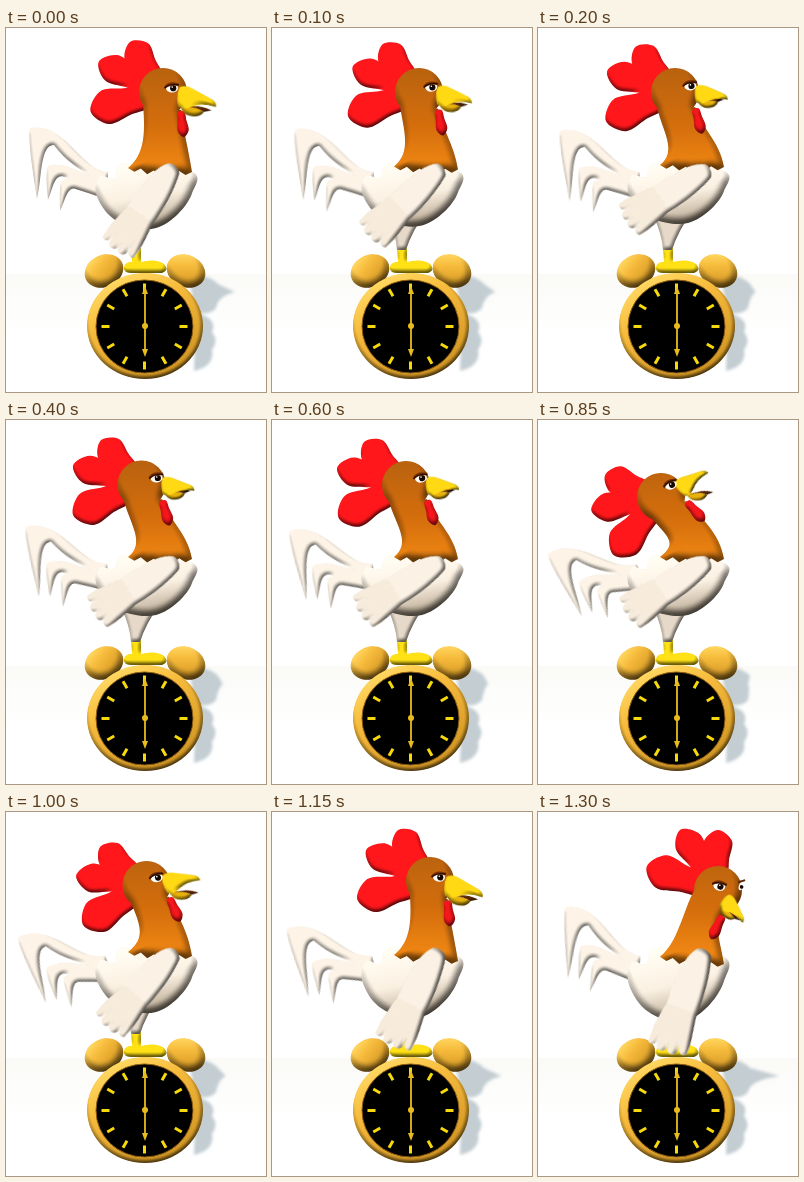
These frames come from a looping animation (260 px wide and 364 px high, 3.3 s). An HTML page:

```html
<!DOCTYPE html>
<html lang="en">
<head>
<meta charset="utf-8">
<title>Rooster on an alarm clock</title>
<style>
html, body { margin: 0; width: 100%; height: 100%; overflow: hidden; background: #fff; }
svg { display: block; width: 100%; height: 100%; }
</style>
</head>
<body>
<svg viewBox="0 0 260 364">
  <defs>
    <filter id="round" x="-10%" y="-10%" width="120%" height="120%" color-interpolation-filters="sRGB">
      <feGaussianBlur in="SourceAlpha" stdDeviation="4"/>
      <feDiffuseLighting surfaceScale="6" diffuseConstant="1.2" lighting-color="#fff" result="lit">
        <feDistantLight azimuth="250" elevation="58"/>
      </feDiffuseLighting>
      <feComposite in="SourceGraphic" in2="lit" operator="arithmetic" k1=".85" k2=".18"/>
    </filter>
    <filter id="thin" x="-10%" y="-10%" width="120%" height="120%" color-interpolation-filters="sRGB">
      <feGaussianBlur in="SourceAlpha" stdDeviation="2"/>
      <feDiffuseLighting surfaceScale="3" diffuseConstant="1.2" lighting-color="#fff" result="lit">
        <feDistantLight azimuth="250" elevation="58"/>
      </feDiffuseLighting>
      <feComposite in="SourceGraphic" in2="lit" operator="arithmetic" k1=".85" k2=".18"/>
    </filter>
    <filter id="soft" x="-20%" y="-20%" width="140%" height="140%"><feGaussianBlur stdDeviation="1.5"/></filter>
    <linearGradient id="floor" x2="0" y2="1">
      <stop stop-color="#fafaf7"/><stop offset="1" stop-color="#fff"/>
    </linearGradient>
    <linearGradient id="gold" x2=".6" y2="1">
      <stop stop-color="#ffe070"/><stop offset=".45" stop-color="#efb53a"/><stop offset="1" stop-color="#cc9222"/>
    </linearGradient>
    <linearGradient id="cream" x2=".3" y2="1">
      <stop stop-color="#fffaf1"/><stop offset=".6" stop-color="#f3e9db"/><stop offset="1" stop-color="#b9aa95"/>
    </linearGradient>
    <linearGradient id="rust" gradientUnits="userSpaceOnUse" x1="0" y1="45" x2="0" y2="145">
      <stop stop-color="#b5600f"/><stop offset=".5" stop-color="#cd6a0c"/><stop offset="1" stop-color="#ea8413"/>
    </linearGradient>
  </defs>
  <rect y="246" width="260" height="60" fill="url(#floor)"/>
  <g fill="#c3cdd2" filter="url(#soft)">
    <path id="shade"/>
    <path d="M190 285Q212 290 206 304Q213 312 206 322Q209 338 188 343Z"/>
  </g>
  <g id="tail" fill="#f6ede0" filter="url(#thin)"></g>
  <g filter="url(#round)" fill="url(#gold)">
    <ellipse cx="98" cy="243" rx="20" ry="16" transform="rotate(-25 98 243)"/>
    <ellipse cx="180" cy="243" rx="20" ry="16" transform="rotate(25 180 243)"/>
  </g>
  <ellipse cx="139" cy="298" rx="58" ry="53" fill="url(#gold)" filter="url(#thin)"/>
  <ellipse cx="138.5" cy="298.5" rx="48.5" ry="46.5" stroke="#8a5c14"/>
  <g id="ticks" stroke="#f6da0c" stroke-width="3"></g>
  <g stroke="#e8bc1c" fill="#e8bc1c">
    <path d="M139 262V326" stroke-width="1.8"/>
    <path d="M139 258L142 266H136ZM139 329L136 321H142Z" stroke="none"/>
    <circle cx="139" cy="298" r="3" stroke="none"/>
  </g>
  <path d="M125 219H135L135 234Q150 230 158 236Q164 242 156 245H126Q117 245 118 239Q119 234 126 234Z" fill="#f8da14" filter="url(#thin)"/>
  <path d="M114 184L154 184Q140 203 134 222L125 222Q124 206 114 184Z" fill="#dfd3c3" filter="url(#thin)"/>
  <path id="body" fill="url(#cream)" filter="url(#round)"/>
  <g id="comb" fill="#f8161a" filter="url(#thin)"></g>
  <g fill="url(#rust)" filter="url(#round)">
    <path id="neck"/>
    <circle id="skull" r="24"/>
  </g>
  <path id="wattle" fill="#ee161a" filter="url(#thin)"/>
  <g id="beak" filter="url(#thin)">
    <g id="jaw">
      <path d="M-1 7Q12 5 22 10Q18 17 8 15Q2 14-1 7Z" fill="#e2ae0c"/>
      <path d="M3 8Q12 5 22 10L29 8Q16 3 3 8Z" fill="#5a2503"/>
    </g>
    <path d="M-1-11Q5-14 12-9Q22-3 30 2Q34 5 33 9Q20 4 9 8Q2 11-3 7Q-5-3-1-11Z" fill="#fbd312"/>
  </g>
  <g id="eye">
    <ellipse rx="6" ry="4.6" fill="#fff"/>
    <circle cx="1.2" cy=".2" r="3.1" fill="#160800"/>
    <circle cx=".2" cy="-.9" r=".8" fill="#fff"/>
    <path d="M-8-1Q-4-8 7-4.5L6-2Q-2-4-7 1Z" fill="#7d3204"/>
    <path d="M-7.5 0Q-2-5 7-3" fill="none" stroke="#2a1002" stroke-width="1.3"/>
    <g id="farEye">
      <ellipse cx="21" cy="-6" rx="2.4" ry="4" fill="#fff"/>
      <circle cx="21.6" cy="-5.5" r="1.8" fill="#160800"/>
      <path d="M17-9L23-13" stroke="#5d2603" stroke-width="2"/>
    </g>
  </g>
  <g id="wing" filter="url(#thin)">
    <path d="M12-5C0-16-30-15-56-14Q-62 0-54 14C-35 17-5 14 10 9Q16 2 12-5Z" fill="#f4eadd"/>
    <g id="fingers" stroke="#f0e5d6" stroke-width="9.5" stroke-linecap="round"></g>
  </g>
</svg>
<script>
const $ = id => document.getElementById(id);
const lerp = (a, b, k) => a + (b - a) * k;
const set = (id, name, v) => $(id).setAttribute(name, v);
const rad = Math.PI / 180;

function add(id, d) {
  const el = document.createElementNS('http://www.w3.org/2000/svg', 'path');
  if (d) el.setAttribute('d', d);
  return $(id).appendChild(el);
}

// Head place, tilt and yaw; beak gape; wing and tail angles; body sink
const keys = [
  { t: 0, x: 157, y: 64, tilt: 0, yaw: 0, gape: 8, wing: 56, tail: 0, sink: 5 },
  { t: 200, x: 137, y: 64, tilt: 8, yaw: 7, gape: 0, wing: 33, tail: 2, sink: 0 },
  { t: 600, x: 134, y: 65, tilt: 11, yaw: 7, gape: 0, wing: 33, tail: 8, sink: 0 },
  { t: 850, x: 123, y: 77, tilt: 36, yaw: 6, gape: 42, wing: 34, tail: 23, sink: 0 },
  { t: 1150, x: 158, y: 69, tilt: -1, yaw: 0, gape: 6, wing: 64, tail: 12, sink: 10 },
  { t: 1300, x: 180, y: 78, tilt: -33, yaw: -10, gape: 0, wing: 70, tail: -4, sink: 13 }
];
const LOOP = 3300;

// The motion advances in held steps: 100 ms, then 150 ms, then a long rest
const hold = t => t < 700 ? t - t % 100 : Math.min(1300, 700 + Math.floor((t - 700) / 150) * 150);

function poseAt(t) {
  const i = Math.max(1, keys.findIndex(k => k.t >= t));
  const [a, b] = [keys[i - 1], keys[i]], pose = {};
  for (const k in a) pose[k] = lerp(a[k], b[k], (t - a.t) / (b.t - a.t));
  return pose;
}

// Closed Catmull-Rom curve
function loop(pts) {
  const at = i => pts[(i + pts.length) % pts.length];
  const ctrl = (p, a, b) => p.map((v, j) => v + (b[j] - a[j]) / 6);
  return `M${pts[0]}` + pts.map((p, i) =>
    `C${ctrl(p, at(i - 1), at(i + 1))} ${ctrl(at(i + 1), at(i + 2), p)} ${at(i + 1)}`).join('') + 'Z';
}

// Drop shape that swells towards its tip
function lobe([rx, ry], [tx, ty], w) {
  const len = Math.hypot(tx - rx, ty - ry);
  const at = (k, s) => [lerp(rx, tx, k) - (ty - ry) / len * w * s, lerp(ry, ty, k) + (tx - rx) / len * w * s];
  return loop([at(0, .6), at(.35, .8), at(.75, 1), at(1, 0), at(.75, -1), at(.35, -.8), at(0, -.6)]);
}

function plume([cx, cy], [tx, ty], i) {
  const s = [1, .6, .5][i], by = 149 + i * 7;
  return `M102 ${by - 5}C75 ${by - 6} ${cx + 36 * s} ${cy - 6} ${cx} ${cy}` +
    `Q${cx - 3} ${cy + 10 * s} ${tx} ${ty}` +
    `C${tx + 5} ${ty - 20 * s} ${cx + 10 * s} ${cy + 16 * s} ${cx + 24 * s} ${cy + 17 * s}` +
    `Q${lerp(cx, 102, .5)} ${lerp(cy, by, .7) + 4} 102 ${by + 9}Z`;
}

// Ragged lower edge of the neck
function ragged([x0, y0], [x1, y1]) {
  let d = '';
  for (let i = 1; i < 10; i++) {
    const k = i / 10;
    d += `L${lerp(x0, x1, k)} ${lerp(y0, y1, k) + Math.sin(k * Math.PI) * 3 + (i % 2 ? 2.5 : -2)}`;
  }
  return d;
}

for (let i = 0; i < 12; i++) {
  const at = r => `${138.5 + Math.sin(i * 30 * rad) * r} ${298.5 - Math.cos(i * 30 * rad) * r}`;
  add('ticks', `M${at(35)}L${at(43)}`);
}
for (let i = -1.5; i < 2; i++) add('fingers', `M-48 ${i * 7}L${-83 + Math.abs(i) * 3} ${i * 10}`);
[[[24, 100], [31, 171]], [[42, 138], [42, 172]], [[56, 152], [54, 183]]]
  .forEach(([crest, tip], i) => add('tail', plume(crest, tip, i)));
const lobes = [0, 1, 2].map(() => add('comb'));
const torso = [[120, 135], [108, 149], [94, 147], [90, 163], [103, 183],
  [125, 194], [150, 195], [172, 182], [186, 163], [186, 143]];

function draw(p) {
  const c = Math.cos(p.tilt * rad), s = Math.sin(p.tilt * rad);
  const head = (x, y) => [p.x + x * c + y * s, p.y - x * s + y * c];

  lobes.forEach((el, i) => {
    const a = ([33, 65, 105][i] + p.tilt) * rad;
    const out = r => [p.x - Math.sin(a) * r, p.y - Math.cos(a) * r];
    el.setAttribute('d', lobe(out(16), out([60, 71, 75][i]), [14, 14, 17][i]));
  });

  const left = [122, 137 + p.sink * .6], right = [186, 139 + p.sink];
  set('neck', 'd', `M${left}C${left[0] + 18} ${left[1] - 14} ${head(-18, 37)} ${head(-20, 12)}` +
    `L${head(18, 18)}C${head(20, 38)} ${right[0] - 4} ${right[1] - 26} ${right}${ragged(right, left)}Z`);
  set('skull', 'cx', p.x);
  set('skull', 'cy', p.y);
  set('wattle', 'd', lobe(head(18, 20), head(21, 45), 5.5));
  set('body', 'd', loop(torso.map(([x, y]) => [x, 135 + (y - 135) * (1 + p.sink / 60)])));

  const size = 1.05 - .025 * Math.abs(p.yaw);
  set('beak', 'transform', `translate(${head(18 + p.yaw * .6, 7)}) rotate(${-p.tilt - p.gape * .3}) scale(${size})`);
  set('jaw', 'transform', `rotate(${p.gape} 0 7)`);
  set('eye', 'transform', `translate(${head(9 + p.yaw, -4)}) rotate(${-p.tilt / 2})`);
  set('farEye', 'opacity', p.yaw < -9 ? 1 : 0);
  set('wing', 'transform', `translate(160 ${147 + p.sink * .3}) rotate(${-p.wing}) scale(${1 + p.sink * .008})`);
  set('tail', 'transform', `rotate(${-p.tail} 100 152)`);
  set('shade', 'd', `M184 250Q200 244 212 256L${210 + (p.x - 123) * .55} 264Q212 268 210 280Q204 288 188 284Z`);
}

let shown;
function tick() {
  const t = hold(performance.now() % LOOP);
  if (t !== shown) draw(poseAt(shown = t));
  requestAnimationFrame(tick);
}
tick();
</script>
</body>
</html>
```
